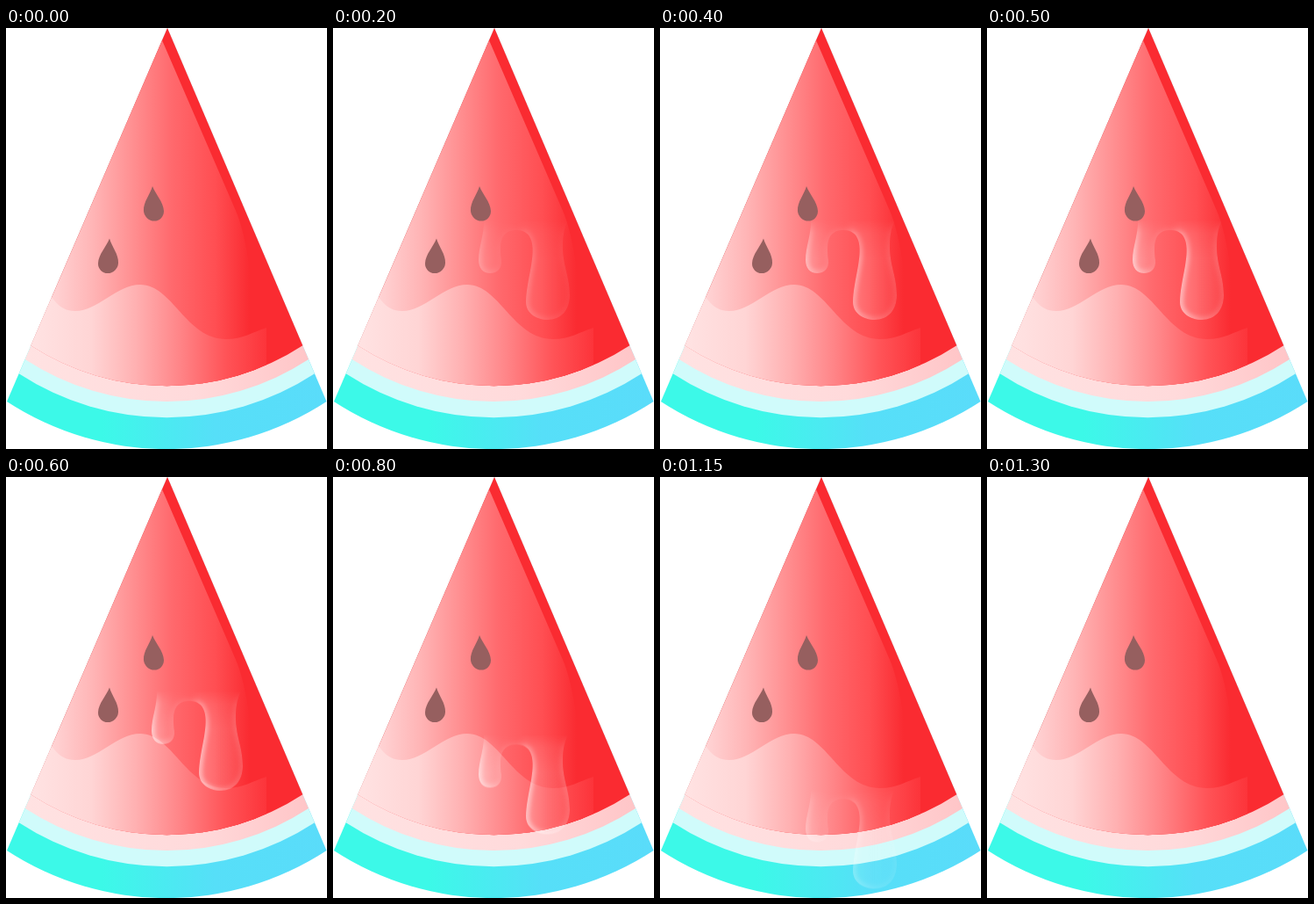
Animation of 366x479 px, one loop 2.15 s. Source, as an HTML page:

```html
<!DOCTYPE html>
<html lang="en">
<head>
<meta charset="utf-8">
<title>Watermelon</title>
<style>
  html, body { margin: 0; width: 100%; height: 100%; overflow: hidden; background: #fff; }
  svg { display: block; width: 100vw; height: 100vh; }

  .drip {
    animation: fade 2150ms infinite, slide 2150ms infinite;
  }
  /* 50 ms ticks: appear 0-500, slide 500-1050, vanish 1000-1300 */
  @keyframes fade {
    0% { opacity: 0; animation-timing-function: steps(10, end); }
    23.2558% { opacity: 1; animation-timing-function: step-end; }
    46.5116% { opacity: 1; animation-timing-function: steps(6, end); }
    60.4651%, 100% { opacity: 0; }
  }
  @keyframes slide {
    0% { transform: translateY(0); animation-timing-function: step-end; }
    23.2558% { transform: translateY(0); animation-timing-function: steps(11, end); }
    48.8372%, 100% { transform: translateY(136.4px); }
  }
</style>
</head>
<body>
<svg viewBox="0 0 366 479" preserveAspectRatio="none">
  <defs>
    <linearGradient id="rind" gradientUnits="userSpaceOnUse" x1="-184" x2="182" y1="0" y2="0">
      <stop offset=".3" stop-color="#3cf9e8"/>
      <stop offset=".65" stop-color="#56dff8"/>
      <stop offset="1" stop-color="#5adcfa"/>
    </linearGradient>
    <linearGradient id="pith" gradientUnits="userSpaceOnUse" x1="-184" x2="182" y1="0" y2="0">
      <stop offset="0" stop-color="#ffe2e2"/>
      <stop offset=".6" stop-color="#ffdadb"/>
      <stop offset="1" stop-color="#ffc5c7"/>
    </linearGradient>
    <linearGradient id="flesh" gradientUnits="userSpaceOnUse" x1="50" x2="278" y1="0" y2="0">
      <stop offset="0" stop-color="#ffd5d6"/>
      <stop offset=".22" stop-color="#ffb4b5"/>
      <stop offset=".44" stop-color="#ff8a8c"/>
      <stop offset=".61" stop-color="#ff696d"/>
      <stop offset=".83" stop-color="#ff4e52"/>
      <stop offset="1" stop-color="#fa2b31"/>
    </linearGradient>
    <linearGradient id="wave" gradientUnits="userSpaceOnUse" x1="27" x2="297" y1="0" y2="0">
      <stop offset="0" stop-color="#ffe3e3"/>
      <stop offset=".26" stop-color="#ffd5d5"/>
      <stop offset=".45" stop-color="#ffb0b1"/>
      <stop offset=".64" stop-color="#ff8386"/>
      <stop offset=".83" stop-color="#ff5357"/>
      <stop offset="1" stop-color="#fc343a"/>
    </linearGradient>
    <linearGradient id="gloss" gradientUnits="userSpaceOnUse" x1="165" x2="271" y1="0" y2="0">
      <stop offset="0" stop-color="#fff" stop-opacity=".28"/>
      <stop offset=".25" stop-color="#fff" stop-opacity=".08"/>
      <stop offset=".42" stop-color="#fff" stop-opacity=".04"/>
      <stop offset=".52" stop-color="#fff" stop-opacity=".24"/>
      <stop offset=".75" stop-color="#fff" stop-opacity=".14"/>
      <stop offset="1" stop-color="#fff" stop-opacity=".09"/>
    </linearGradient>
    <linearGradient id="edge" gradientUnits="userSpaceOnUse" x1="165" x2="271" y1="0" y2="0">
      <stop offset="0" stop-color="#fff" stop-opacity=".5"/>
      <stop offset=".25" stop-color="#fff" stop-opacity=".12"/>
      <stop offset=".45" stop-color="#fff" stop-opacity=".2"/>
      <stop offset=".53" stop-color="#fff" stop-opacity=".5"/>
      <stop offset=".75" stop-color="#fff" stop-opacity=".22"/>
      <stop offset="1" stop-color="#fff" stop-opacity=".12"/>
    </linearGradient>
    <linearGradient id="reveal" gradientUnits="userSpaceOnUse" x1="0" x2="0" y1="218" y2="262">
      <stop offset="0" stop-color="#000"/>
      <stop offset=".35" stop-color="#999"/>
      <stop offset="1" stop-color="#fff"/>
    </linearGradient>
    <mask id="top" maskUnits="userSpaceOnUse" x="150" y="210" width="140" height="140">
      <path d="M150 210h140v140h-140z" fill="url(#reveal)"/>
    </mask>
    <filter id="soft" filterUnits="userSpaceOnUse" x="150" y="205" width="140" height="145">
      <feGaussianBlur stdDeviation="2.6"/>
    </filter>
    <path id="outline" d="M172 219C172 238 166 248 166 264C166 273 171 279 179 279C188 279 193 273 192 264C191 254 187 230 209 230C228 230 230 248 226 270C223 287 220 300 220 312C220 324 231 332 245 332C260 332 270 321 270 304C270 282 262 271 262 248C262 236 264 227 268 219"/>
    <clipPath id="inside"><use href="#outline"/></clipPath>
    <path id="sector" d="M0 0L-183 425A334 334 0 0 0 181.500 425Z"/>
    <clipPath id="slice"><use href="#sector" transform="translate(184 0) scale(.85)"/></clipPath>
    <path id="seed" d="M0 0C3 9 11.500 18 11.500 28A11.500 11.500 0 0 1 -11.500 28C-11.500 18 -3 9 0 0Z"/>
  </defs>

  <g transform="translate(184 0)">
    <use href="#sector" fill="url(#rind)"/>
    <use href="#sector" fill="#d0fbfb" transform="scale(.925)"/>
    <use href="#sector" fill="url(#pith)" transform="scale(.887)"/>
  </g>

  <g clip-path="url(#slice)">
    <path fill="#fa2b31" d="M0 0H366V479H0Z"/>
    <path fill="url(#flesh)" d="M178 14L262 208Q278 245 285 345V420H0V0H178Z"/>
    <path fill="url(#wave)" d="M40 296C56 306 58 322 79 322C105 322 126 292 153 292C190 292 205 354 251 354C270 354 281 346 297 341V420H0V296Z"/>
  </g>

  <g fill="#965f5f">
    <use href="#seed" transform="translate(167 180) skewX(3)"/>
    <use href="#seed" transform="translate(118 239.500) skewX(-3)"/>
  </g>

  <g class="drip">
    <g mask="url(#top)">
      <g clip-path="url(#inside)">
        <use href="#outline" fill="url(#gloss)"/>
        <use href="#outline" fill="none" stroke="url(#edge)" stroke-width="7" filter="url(#soft)"/>
      </g>
    </g>
  </g>
</svg>
</body>
</html>
```
